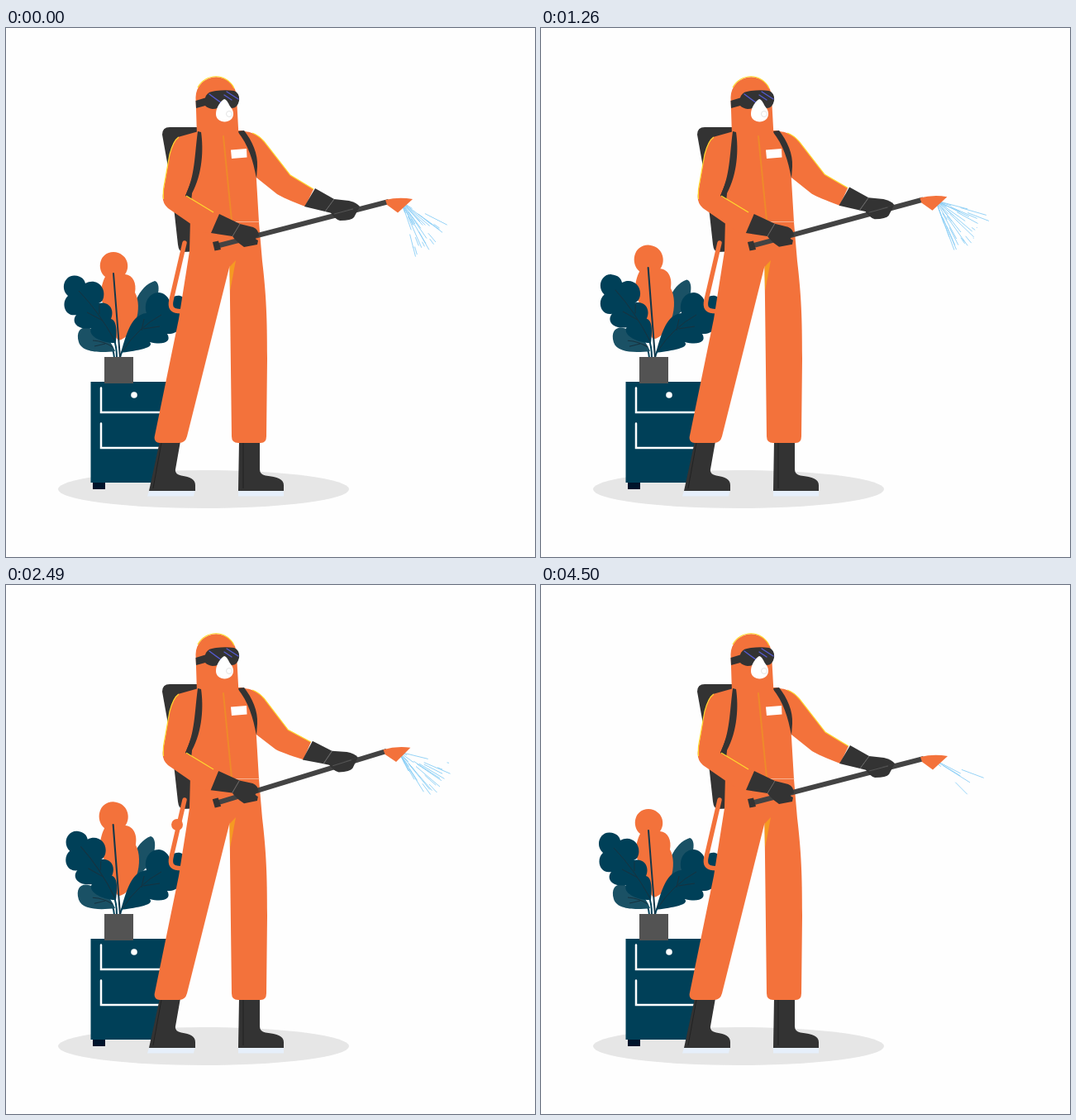
An HTML page that plays this animation: 640x640 px, repeating every 4.53 s.

```html
<!DOCTYPE html>
<html>
<head>
<meta charset="utf-8">
<style>
html, body { margin: 0; width: 100%; height: 100%; overflow: hidden; background: #fefefe; }
svg { display: block; width: 100vw; height: 100vh; }
.suit { fill: #f3723b; }
.dark { fill: #333; }
.navy { fill: #004058; }
.teal { fill: #1a5165; }
.line { fill: none; stroke-linecap: round; }
.rim { fill: none; stroke: #ffd92e; stroke-width: 1.2; }
.vein { fill: none; stroke: #17323f; stroke-width: 1; }
</style>
</head>
<body>
<svg viewBox="0 0 640 640">
  <ellipse cx="239" cy="558" rx="176" ry="23" fill="#e6e6e6"/>

  <!-- cabinet -->
  <path class="navy" d="M102.500 428H200V550H102.500Z"/>
  <path fill="#00142b" d="M105 550H120V558H105Z"/>
  <path class="line" stroke="#fff" stroke-width="2.500" d="M115 435.500V465H200M115 478.500V508H200"/>
  <circle cx="155" cy="444" r="3.800" fill="#fff"/>

  <!-- plant -->
  <path class="line" stroke="#004058" stroke-width="2" d="M131 399Q130 387 124 380M134 399Q134 385 130 375M138 399Q139 391 146 385"/>
  <path id="tealRight" class="teal" d="M146 368C151 340 160 312 180 306C190 309 183 338 167 348Z"/>
  <g id="orangeLeaf">
    <path class="suit" d="M136 378C127 368 123 350 119 335C112 328 115 310 120 301C109 292 113 271 130 271C147 272 151 289 144 298C154 299 158 309 156 320C166 338 156 374 136 378Z"/>
    <path class="line" stroke="#14384a" stroke-width="2" d="M130 297L138 399"/>
  </g>
  <g id="leafRight">
    <path class="navy" d="M139 393C144 376 150 352 163 347Q166 345 170 345C166 331 174 320 185 320C193 321 198 327 198 333C200 322 215 320 217 332C218 340 215 344 212 348C215 362 207 371 195 370C201 380 190 384 174 380C181 388 152 391 139 393Z"/>
    <path class="vein" d="M141 391Q160 362 188 347M164 366L167 352M166 364L186 361"/>
  </g>
  <g id="leafLow">
    <path class="teal" d="M132 391C115 393 92 393 88 380C84 366 92 360 101 363C113 366 126 375 132 391Z"/>
    <path class="vein" d="M129 386Q119 379 105 378M120 382L107 385"/>
  </g>
  <g id="leafLeft">
    <path class="navy" d="M133 381C120 382 98 374 103 363C87 366 78 356 85 347C71 350 66 332 75 324C65 315 71 299 83 299.500C91 300 95 304 96 309C108 302 121 312 118 326C117 330 115 332 112 333C124 330 132 340 127 352C135 354 134 370 133 381Z"/>
    <path class="vein" d="M132 379Q113 344 88 318M113 346L113 335M117 354L98 344"/>
  </g>
  <path fill="#535353" d="M119 398H154V430H119Z"/>

  <!-- pack and hose -->
  <path class="dark" d="M189 129Q189 120 198 120H236L238 270L213 271Q209 270 208 262L204 226L196 168Z"/>
  <path id="hose" class="line" stroke="#f3723b" stroke-width="5.500" d="M216 260L200 329Q197 342 208 342.500L216 343"/>
  <circle id="bulge" class="suit"/>

  <!-- boots -->
  <g id="boots">
    <path class="dark" d="M186 500H211L205 534Q204 540 212 541.500C223 543 229 546 229 553V560H173Z"/>
    <path class="dark" d="M282 500H307V534Q307 540 314 541.500C329 543 336 546 336 553V560H281Z"/>
    <path fill="none" stroke="#222" d="M188 502L178 557M287 502V557"/>
    <path fill="#e6effb" d="M173 560H228.500L227 566.500H171ZM281 560H336V566.500H281Z"/>
  </g>

  <!-- body -->
  <path id="farArm" class="suit"/>
  <path id="farRim" class="rim"/>
  <path class="suit" d="M223 230L228 140L232 124H285Q299 125 300 150L303 184L306 235L310 282C315 325 316 350 316 400L315 494Q315 502 308 502H281Q273 502 273 494L270.500 288L219 494Q217 502 209 502H186Q178 501 180 493L209 352L222 270Z"/>
  <path fill="#f59a22" d="M270.500 289L278 281L273 308L271 318Z"/>
  <path class="line" stroke="#ef8a2a" stroke-width="2" d="M263 131L273 233"/>
  <path class="line" stroke="#f8b08e" d="M272 234.500H306"/>
  <path fill="#fff" d="M272 147.500L291 146L291.500 156.500L273 158Z"/>
  <path class="dark" d="M280 125L288 124C298 137 305 152 304 168L303 182C299 160 293 141 280 125Z"/>

  <!-- head -->
  <path class="suit" d="M231 130L229.500 84A24.700 24.700 0 0 1 279 84L281.500 130Z"/>
  <path class="rim" d="M232 72A24.500 24.500 0 0 1 276 73"/>
  <path class="dark" d="M229.500 88L241 84.500Q243 78 249 77Q263 74 276 76Q283 79 282 88Q280 97 273 97Q268 97 264 91Q258 98 250 98Q244 97 241 94L230 97Z"/>
  <path class="line" stroke="#555ad0" stroke-width="1.300" d="M246 80L261 91M264 81L273 87M267 77L281 86"/>
  <path fill="#fff" d="M264 86C268 87 269 92 272 96C274 98 275 101 275 104C275 110 270 113.500 264.500 113.500S254 110 254 104C254 96 260 88 264 86Z"/>
  <circle cx="270" cy="104" r="3.500" fill="none" stroke="#e4e4e4"/>

  <!-- near arm -->
  <path class="suit" d="M233 125L208 132Q202 136 198 153L190 200Q188 211 196 218L238 247L250 249L259 226L217 203L230 170Z"/>
  <path class="rim" d="M209 132Q202 137 198 153L191 192Q190 197 190.500 207"/>
  <path class="dark" d="M232 125L236 126C239 146 238 176 225 200L224 206L217 203C229 178 228 154 232 125Z"/>
  <path class="rim" d="M218 203L251 223"/>

  <!-- sprayer -->
  <g id="wand">
    <path class="dark" d="M374 194L397 207L386 222L361 216Z"/>
    <path class="dark" d="M397 207L415 209Q424 211 428 216L417 223L394 224L386 222Z"/>
    <path stroke="#666" d="M397 207L386 222" fill="none"/>
    <path stroke="#434343" stroke-width="6" d="M256 263.500L463 210"/>
    <path class="dark" d="M250 259L257 257.500L260 268L252.500 269.500Z"/>
    <path class="dark" d="M392 222L415 220L428 216L421 229Q418 233 404 233Q397 231 392 222Z"/>
    <path stroke="#555" stroke-width="1" d="M397 225L420 219"/>
    <path id="spray" class="line" stroke="#8ccff6" stroke-width=".9"/>
    <path class="suit" d="M459 208Q475 204 492 207L474 223.500L461 214Z"/>
  </g>
  <g id="nearHand">
    <path class="dark" d="M258 225L283 237L274 252L248 248Z"/>
    <path class="dark" d="M283 237L299 241Q306 244 306 252Q298 254 305 257L304 262L288 265Q280 260 274 252Z"/>
    <path stroke="#666" d="M283 237L274 252" fill="none"/>
  </g>
</svg>
<script>
const LOOP = 4530, STEP = 30;
const el = id => document.getElementById(id);
const set = (id, name, value) => el(id).setAttribute(name, value);
const pivot = [254, 264];

// Cosine easing through a flat list of time, value pairs.
function ease(t, keys) {
  let i = 0;
  while (i + 4 < keys.length && t >= keys[i + 2]) i += 2;
  const [t0, v0, t1, v1] = keys.slice(i, i + 4);
  const p = Math.min(1, (t - t0) / (t1 - t0));
  return v0 + (v1 - v0) * (1 - Math.cos(Math.PI * p)) / 2;
}

const liftKeys = [0, 0, 755, .68, 840, .64, 1510, 0, 1740, .14, 2250, .95, 2490, .71,
  3020, 0, 3180, .07, 3780, 1, 3840, 1, 4500, 0, LOOP, 0];
const swayKeys = [0, 0, 840, 1, 1620, 0, 1740, .2, 2250, .8, 2490, .6, 2850, 0,
  3180, .6, 3500, .9, 3840, .95, 4500, 0, LOOP, 0];
const growKeys = [0, 0, 840, 1, 1740, .55, 2490, .82, 3180, .73, 3840, .36, 4500, 0, LOOP, 0];
const leanKeys = [0, 0, 2700, 0, 3180, 1, 3660, 0, LOOP, 0];
const densityKeys = [0, .75, 900, .95, 1740, .95, 2490, .65, 3180, .5, 3840, .2, 4500, .15, LOOP, .15];
const highKeys = [0, 24, 600, 12, LOOP, 12];
const lowKeys = [0, 80, 1740, 74, 2490, 70, 3180, 58, 3840, 46, LOOP, 48];

let seed = 7;
const random = () => (seed = seed * 16807 % 2147483647) / 2147483647;
for (let i = 0; i < 5; i++) random();
const jets = Array.from({ length: 38 }, (_, i) => ({
  rank: (i * .618) % 1, angle: random(), phase: random(), reach: 48 + 14 * random()
}));

function sprayPath(t) {
  const density = ease(t, densityKeys), low = ease(t, lowKeys), high = ease(t, highKeys);
  return jets.filter(j => j.rank < density).map(j => {
    const a = (high + (low - high) * j.angle) * Math.PI / 180;
    const p = (t / 755 + j.phase) % 1 * 1.7;
    const from = j.reach * Math.max(0, p - .7), to = j.reach * Math.min(1, p);
    const x = 485 - 5 * j.angle, y = 213 + 5 * j.angle;
    const at = d => (x + d * Math.cos(a)).toFixed(1) + " " + (y + d * Math.sin(a)).toFixed(1);
    return "M" + at(from) + "L" + at(to);
  }).join("");
}

function drawArm(angle) {
  const turn = (x, y, k = 1) => {
    const a = angle * k * Math.PI / 180, dx = x - pivot[0], dy = y - pivot[1];
    return `${pivot[0] + dx * Math.cos(a) - dy * Math.sin(a)} ${pivot[1] + dx * Math.sin(a) + dy * Math.cos(a)} `;
  };
  const elbow = turn(344, 178, .7), wrist = turn(372, 195);
  set("farArm", "d", `M284 125Q301 124 312 137L${elbow}L${wrist}L${turn(362, 216)}Q${turn(336, 206, .8)}${turn(328, 201, .7)}L303 181Z`);
  set("farRim", "d", `M298 127Q306 130 312 137L${elbow}L${wrist}`);
}

function drawBulge(t) {
  const hose = el("hose"), p = t / (LOOP / 2) % 1;
  const spot = hose.getPointAtLength(Math.min(1, p / .42) ** .8 * hose.getTotalLength());
  set("bulge", "cx", spot.x - 2);
  set("bulge", "cy", spot.y);
  set("bulge", "r", p < .4 ? 7 * Math.min(1, p / .06, (.4 - p) / .02) : 0);
}

function draw(t) {
  const angle = -3.5 * ease(t, liftKeys);
  const sway = ease(t, swayKeys), grow = ease(t, growKeys), lean = ease(t, leanKeys);
  set("wand", "transform", `rotate(${angle} ${pivot})`);
  set("nearHand", "transform", `rotate(${angle / 2} ${pivot})`);
  set("leafLeft", "transform", `rotate(${3.6 * sway} 133 381)`);
  set("leafLow", "transform", `rotate(${-sway} 132 391)`);
  set("tealRight", "transform", `rotate(${-6 * sway} 145 385)`);
  set("leafRight", "transform", `rotate(${-3 * lean} 139 393)`);
  set("orangeLeaf", "transform", `translate(137 399) scale(${1 + .06 * grow} ${1 + .084 * grow}) translate(-137 -399)`);
  set("spray", "d", sprayPath(t));
  drawArm(angle);
  drawBulge(t);
}

function frame() {
  draw(Math.floor(performance.now() % LOOP / STEP) * STEP);
  requestAnimationFrame(frame);
}
frame();
</script>
</body>
</html>
```
